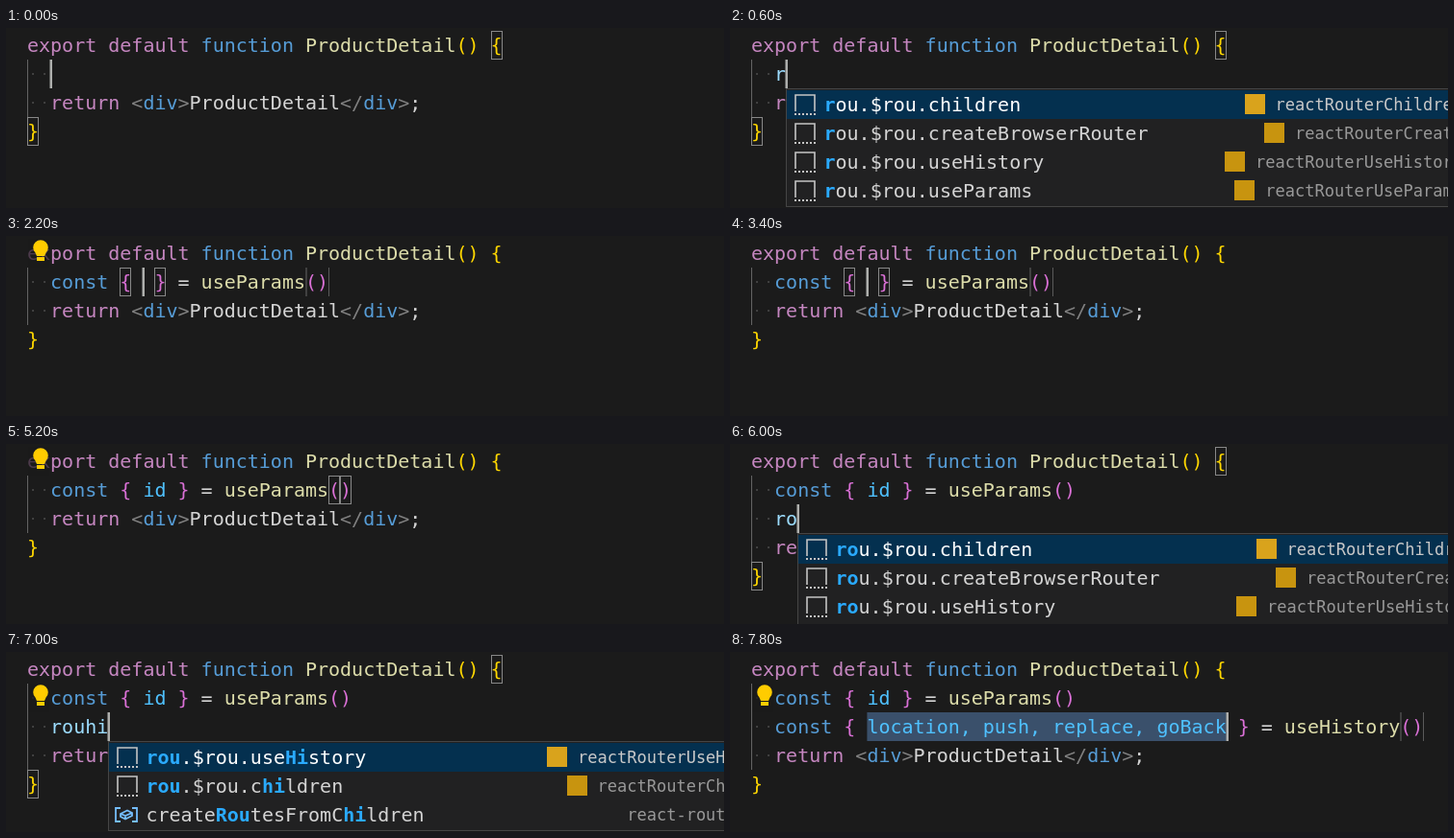
Animation, 746 px wide and 188 px high, one loop 8000 ms. Source, as an HTML page with a canvas:

```html
<!DOCTYPE html>
<html lang="en">
<head>
<meta charset="utf-8">
<title>Editor snippets</title>
<style>
html, body { margin: 0; width: 746px; height: 188px; overflow: hidden; background: #1b1b1b; }
canvas { display: block; }
</style>
</head>
<body>
<canvas id="stage" width="746" height="188"></canvas>
<script>
const ctx = document.getElementById('stage').getContext('2d');
const LOOP = 8000, TICK = 200;
const LEFT = 22, TOP = 3, LINE = 30, CHAR = 12.04;
const MONO = '"DejaVu Sans Mono", "Liberation Mono", monospace';
const C = {
  bg: '#1b1b1b', key: '#c586c0', blue: '#569cd6', fn: '#dcdcaa', gold: '#ffd700',
  pink: '#da70d6', text: '#d4d4d4', tag: '#808080', konst: '#4fc1ff', name: '#9cdcfe',
  match: '#2aaaff', box: '#888888', icon: '#c5c5c5', square: '#d9a31c'
};

const colX = col => LEFT + col * CHAR;
const rowY = row => TOP + row * LINE;

function fill(color, x, y, w, h) {
  ctx.fillStyle = color;
  ctx.fillRect(x, y, w, h);
}

function write(str, x, y, color, font) {
  ctx.font = font || `20px ${MONO}`;
  ctx.fillStyle = color;
  ctx.fillText(str, x, y);
}

// Code line: alternating text and colour
function code(row, col, ...parts) {
  for (let i = 0; i < parts.length; i += 2) {
    write(parts[i], colX(col), rowY(row) + 22, parts[i + 1]);
    col += parts[i].length;
  }
}

function bracket(row, col) {
  ctx.strokeStyle = C.box;
  ctx.lineWidth = 1;
  ctx.strokeRect(Math.round(colX(col)) + 0.5, rowY(row) + 0.5, 11, 29);
}

function indent(row) {
  for (const col of [0.5, 1.5]) fill('#414141', colX(col) - 1, rowY(row) + 14, 2, 2);
}

function hook(row, vars, call) {
  const end = 11 + vars.length;
  code(row, 2, 'const ', C.blue, '{ ', C.pink, vars, C.konst, ' } ', C.pink,
    '= ', C.text, call, C.fn, '()', C.pink);
  return { close: end, open: end + 4 + call.length };
}

// Empty snippet stops around the call parentheses
function tabStops(row, col) {
  fill('#404040', Math.round(colX(col)), rowY(row), 2, LINE);
  fill('#5a5a5a', Math.round(colX(col + 2)), rowY(row), 1, LINE);
}

function bulb(row) {
  const x = 36, y = rowY(row) + 9;
  ctx.globalAlpha = 0.7;
  fill(C.bg, 23, rowY(row), 22, LINE);
  ctx.globalAlpha = 1;
  ctx.fillStyle = '#ffcc00';
  ctx.beginPath();
  ctx.arc(x, y, 7.8, Math.PI * 0.75, Math.PI * 0.25);
  ctx.lineTo(x + 4, y + 9);
  ctx.lineTo(x - 4, y + 9);
  ctx.fill();
  fill('#ffcc00', x - 4, y + 10, 8, 4);
}

function snippetIcon(x, y) {
  ctx.strokeStyle = C.icon;
  ctx.lineWidth = 1.6;
  ctx.beginPath();
  ctx.moveTo(x + 1, y + 18);
  ctx.lineTo(x + 1, y + 1);
  ctx.lineTo(x + 21, y + 1);
  ctx.lineTo(x + 21, y + 18);
  ctx.stroke();
  for (let i = 0; i < 6; i++) fill(C.icon, x + i * 4, y + 20, 2, 2);
}

function variableIcon(x, y) {
  ctx.strokeStyle = '#75beff';
  ctx.lineWidth = 1.8;
  ctx.beginPath();
  for (const [a, b] of [[5, 0], [17, 22]]) {
    ctx.moveTo(x + a, y + 4);
    ctx.lineTo(x + b, y + 4);
    ctx.lineTo(x + b, y + 18);
    ctx.lineTo(x + a, y + 18);
  }
  ctx.moveTo(x + 5, y + 10);
  ctx.lineTo(x + 12, y + 6.5);
  ctx.lineTo(x + 17, y + 9);
  ctx.lineTo(x + 17, y + 12);
  ctx.lineTo(x + 10, y + 15.5);
  ctx.lineTo(x + 5, y + 13);
  ctx.closePath();
  ctx.moveTo(x + 5, y + 10);
  ctx.lineTo(x + 10, y + 12);
  ctx.lineTo(x + 17, y + 9);
  ctx.moveTo(x + 10, y + 12);
  ctx.lineTo(x + 10, y + 15.5);
  ctx.stroke();
}

// Matched letters stand between bars
const lists = {
  r: [
    ['|r|ou.$rou.children', 'reactRouterChildren'],
    ['|r|ou.$rou.createBrowserRouter', 'reactRouterCreate'],
    ['|r|ou.$rou.useHistory', 'reactRouterUseHistory'],
    ['|r|ou.$rou.useParams', 'reactRouterUseParams']
  ],
  roupa: [
    ['|rou|.$rou.use|Pa|rams', 'reactRouterUseParams'],
    ['|rou|.$rou.useSearch|Pa|rams', 'reactRouterUseSearchParams'],
    ['|R|eactQ|u|eryDevt|o|ols|Pa|nel', 'react-query/types/devtools', true]
  ],
  rouhi: [
    ['|rou|.$rou.use|Hi|story', 'reactRouterUseHistory'],
    ['|rou|.$rou.c|hi|ldren', 'reactRouterChildren'],
    ['create|Rou|tesFromC|hi|ldren', 'react-router-dom', true]
  ]
};
const widen = word => lists.r.map(([label, info]) =>
  [`|${word}|${label.slice(3).slice(word.length - 1)}`, info]);
lists.ro = widen('ro');
lists.rou = widen('rou');
lists.rouh = lists.rouhi.map(([label, ...rest]) =>
  [label.replace(/\|([Hh])i\|/, '|$1|i'), ...rest]);

function popup(row, word) {
  const items = lists[word] || lists.roupa;
  const x = Math.round(colX(2 + word.length)) + 1, y = rowY(row + 1);
  const h = items.length * LINE + 4;
  fill('#454545', x - 1, y, 800, h);
  fill('#212122', x, y + 1, 800, h - 2);
  items.forEach(([label, info, variable], i) => {
    const top = y + 2 + i * LINE, picked = i === 0;
    if (picked) fill('#04304f', x, top, 800, LINE);
    (variable ? variableIcon : snippetIcon)(x + (variable ? 7 : 8), top + 4);
    let tx = x + 38.5;
    label.split('|').forEach((part, k) => {
      const hit = k % 2;
      write(part, tx, top + 22, hit ? C.match : picked ? '#ffffff' : C.text,
        `${hit ? 'bold ' : ''}20px ${MONO}`);
      tx += part.length * CHAR;
    });
    const ix = x + 702 - info.length * 10.235;
    if (!variable) fill(picked ? C.square : '#c8940f', Math.round(ix) - 32, top + 4, 21, 21);
    write(info, ix, top + 21, picked ? '#c8c8c8' : '#989898', `17px ${MONO}`);
  });
}

// at: start time, word: typed prefix, vars: destructured names, bulb: its row
const steps = [
  { at: -400, word: '' },
  { at: 600, word: 'r' },
  { at: 800, word: 'ro' },
  { at: 1000, word: 'rou', bulb: 0 },
  { at: 1200, word: 'roupa', bulb: 0 },
  { at: 1800, vars: '', caret: 10, bulb: 0 },
  { at: 3000, vars: '', caret: 10 },
  { at: 3800, vars: 'i', caret: 11 },
  { at: 4000, vars: 'id', caret: 12 },
  { at: 4600, vars: 'id', caret: 28 },
  { at: 5000, vars: 'id', caret: 28, bulb: 0, blink: 4600 },
  { at: 5400, vars: 'id', word: '' },
  { at: 5800, vars: 'id', word: 'r' },
  { at: 6000, vars: 'id', word: 'ro' },
  { at: 6200, vars: 'id', word: 'rou' },
  { at: 6800, vars: 'id', word: 'rouh', bulb: 1 },
  { at: 7000, vars: 'id', word: 'rouhi', bulb: 1 },
  { at: 7800, vars: 'id', picked: 'location, push, replace, goBack', bulb: 1 }
];

function draw(t) {
  const s = steps.filter(step => step.at <= t).pop();
  const typing = s.word !== undefined;
  const first = s.vars !== undefined;
  const extra = first && (typing || s.picked);
  const last = extra ? 4 : 3;
  const editRow = extra ? 2 : 1;
  let caret = s.caret;

  fill(C.bg, 0, 0, 746, 188);
  fill('#646464', LEFT, rowY(1), 1, (last - 1) * LINE);
  for (let row = 1; row < last; row++) indent(row);

  code(0, 0, 'export default ', C.key, 'function ', C.blue, 'ProductDetail', C.fn, '() {', C.gold);

  if (first) {
    const spot = hook(1, s.vars, 'useParams');
    if (caret === 28) {
      bracket(1, spot.open);
      bracket(1, spot.open + 1);
    } else if (caret) {
      bracket(1, 8);
      bracket(1, spot.close);
      tabStops(1, spot.open);
    }
  }
  if (s.picked) {
    caret = 10 + s.picked.length;
    fill('#3a506b', colX(10), rowY(2), s.picked.length * CHAR, LINE);
    tabStops(2, hook(2, s.picked, 'useHistory').open);
  }
  if (typing) {
    caret = 2 + s.word.length;
    code(editRow, 2, s.word, C.name);
    bracket(0, 40);
    bracket(last, 0);
  }

  code(last - 1, 2, 'return ', C.key, '<', C.tag, 'div', C.blue, '>', C.tag,
    'ProductDetail', C.text, '</', C.tag, 'div', C.blue, '>', C.tag, ';', C.text);
  code(last, 0, '}', C.gold);

  if (s.bulb !== undefined) bulb(s.bulb);
  if (s.word) popup(editRow, s.word);

  const since = t - (s.blink || s.at);
  if (since % 1000 < 600) fill('#aeafad', Math.round(colX(caret)) - 0.5, rowY(editRow), 2.5, LINE);
}

const start = performance.now();
function frame() {
  const t = (performance.now() - start) % LOOP;
  draw(Math.floor(t / TICK) * TICK);
  requestAnimationFrame(frame);
}
frame();
</script>
</body>
</html>
```
